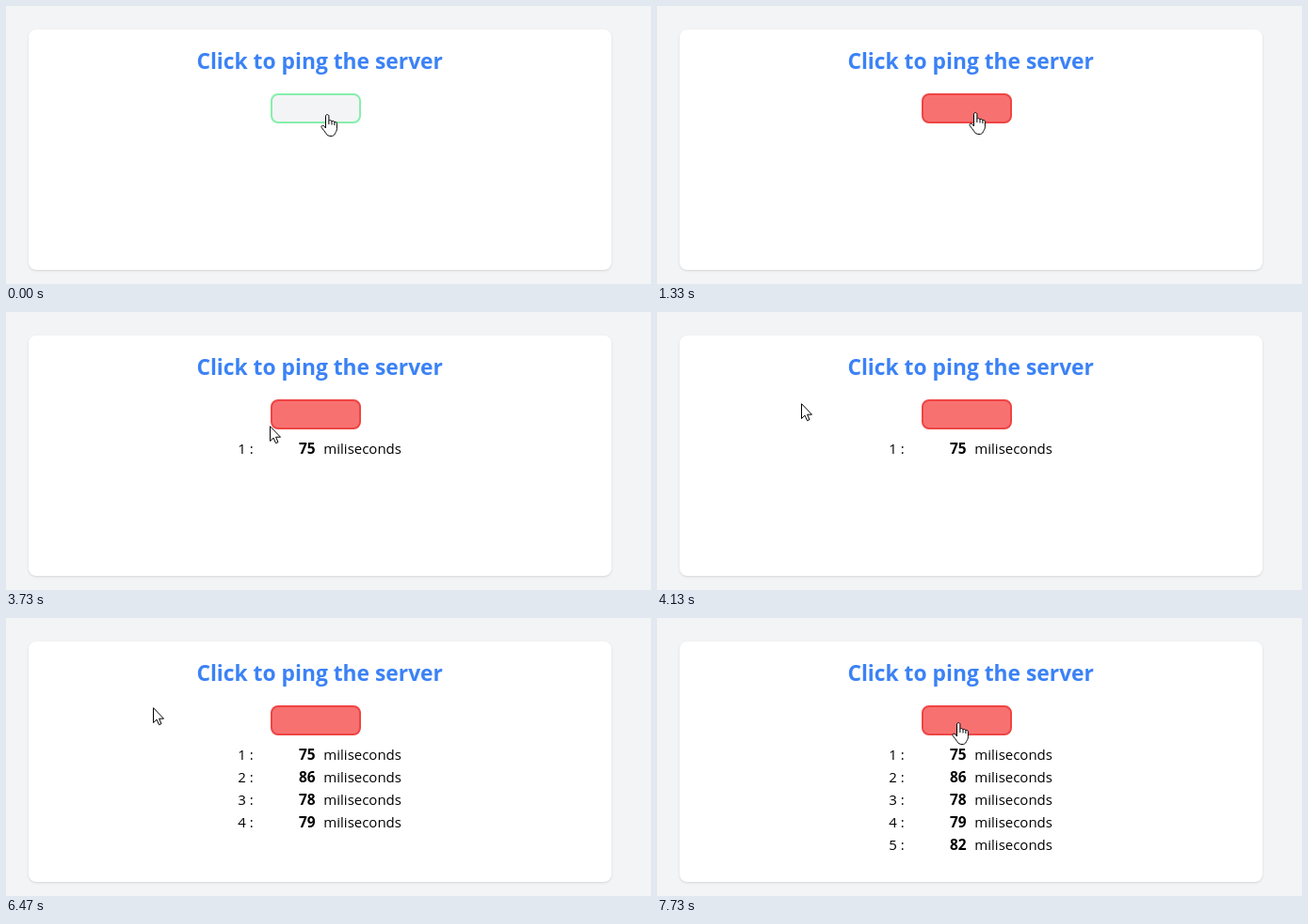
Recreate the animation shown at these times as an HTML page. Size 685 by 296 pixels, loop 8000 ms.

```html
<!DOCTYPE html>
<html lang="en">
<head>
<meta charset="utf-8">
<title>Ping</title>
<style>
  html, body { margin: 0; width: 100%; height: 100%; overflow: hidden; background: #f3f4f6; }
  #card, #button, svg { position: absolute; box-sizing: border-box; }
  #card {
    left: 24px; top: 25px; width: 619px; height: 256px;
    background: #fff; border-radius: 8px;
    box-shadow: 0 1px 3px rgba(0, 0, 0, .1), 0 1px 2px -1px rgba(0, 0, 0, .1);
  }
  #button {
    --busy: 0%;
    left: 281px; top: 93px; width: 96px; height: 32px; border-radius: 8px;
    border: 2px solid color-mix(in srgb, #86efac, #ef4444 var(--busy));
    background: color-mix(in srgb, #f3f4f6, #f87171 var(--busy));
  }
  svg { left: 0; top: 0; }
  text { font: 15px "Open Sans", "Noto Sans", sans-serif; white-space: pre; }
  .title { font-size: 22.8px; font-weight: 700; fill: #3b82f6; }
  .value { font-size: 15.4px; font-weight: 700; }
  #hand, #arrow { fill: #fff; stroke: #000; stroke-linejoin: round; }
</style>
</head>
<body>
<div id="card"></div>
<div id="button"></div>
<svg width="685" height="296" viewBox="0 0 685 296">
  <text class="title" x="202.4" y="67">Click to ping the server</text>
  <g id="rows"></g>
  <g id="hand">
    <path d="M5.5 15V2.2C5.5 .1 8.9 .1 8.9 2.2V7.4C9.3 6.2 11.9 6.3 12 8C12.6 7 14.7 7.2 14.9 8.9C15.6 8 17.4 8.4 17.4 10.2V15.5C17.4 18 16.2 19 15.6 20.6C14.6 23 13 23.5 11 23.5C8.5 23.5 7 22.6 5.8 20.5C4.6 18.3 2.9 17 1.3 14.6C0 12.6 2.6 11.4 4 13Z"/>
    <path fill="none" d="M8.9 7.4V11M12 8V11.5M14.9 9V12"/>
  </g>
  <path id="arrow" d="M.5 .7V16.5L4.1 13.1L6.5 18.7L9 17.6L6.6 12.2H11.5Z"/>
</svg>
<script>
const LOOP = 8000;
const $ = id => document.getElementById(id);

const pings = [
  { time: 3270, ms: 75 },
  { time: 4530, ms: 86 },
  { time: 5200, ms: 78 },
  { time: 6470, ms: 79 },
  { time: 7200, ms: 82 }
];

// Each move starts where the previous one ended; "via" bends its path.
const home = [341, 115];
const moves = [
  { start: 70, end: 400, steps: 3, to: [338, 113] },
  { start: 3530, end: 4130, steps: 10, to: [153, 97], via: [262, 134] },
  { start: 4200, end: 4330, steps: 3, to: [156, 95] },
  { start: 7200, end: 7730, steps: 9, to: [320, 111] }
];

const ease = p => p * p * (3 - 2 * p);

// Share of the move done, in equal steps with the first one at its start
function progress({ start, end, steps }, t) {
  if (t < start) return 0;
  const step = 1 + Math.floor((t - start) / (end - start) * (steps - 1));
  return ease(Math.min(step / steps, 1));
}

function pointerAt(t) {
  let from = home;
  for (const move of moves) {
    const p = progress(move, t), q = 1 - p, { to, via } = move;
    from = from.map((a, i) => {
      const bend = via ? via[i] : (a + to[i]) / 2;
      return q * q * a + 2 * p * q * bend + p * p * to[i];
    });
  }
  return from.map(Math.round);
}

function add(parent, tag, attrs = {}, content = '') {
  const el = document.createElementNS('http://www.w3.org/2000/svg', tag);
  for (const name in attrs) el.setAttribute(name, attrs[name]);
  el.textContent = content;
  parent.append(el);
  return el;
}

const rows = pings.map(({ ms }, i) => {
  const row = add($('rows'), 'g');
  const y = 151 + i * 24;
  add(row, 'text', { x: 246.2, y }, `${i + 1} :`);
  add(row, 'text', { x: 311, y, class: 'value' }, ms);
  add(row, 'text', { x: 337.3, y }, 'miliseconds');
  return row;
});

const show = (el, on) => { el.style.visibility = on ? 'visible' : 'hidden'; };

function draw(t) {
  rows.forEach((row, i) => show(row, t >= pings[i].time));

  const busy = progress({ start: 1270, end: 1330, steps: 2 }, t);
  $('button').style.setProperty('--busy', `${busy * 100}%`);

  const [x, y] = pointerAt(t);
  const over = x >= 281 && x < 377 && y >= 93 && y < 125;
  show($('hand'), over);
  show($('arrow'), !over);
  $('hand').setAttribute('transform', `translate(${x - 7} ${y})`);
  $('arrow').setAttribute('transform', `translate(${x} ${y})`);
}

const start = performance.now();
function tick() {
  draw((performance.now() - start) % LOOP);
  requestAnimationFrame(tick);
}
tick();
</script>
</body>
</html>
```
